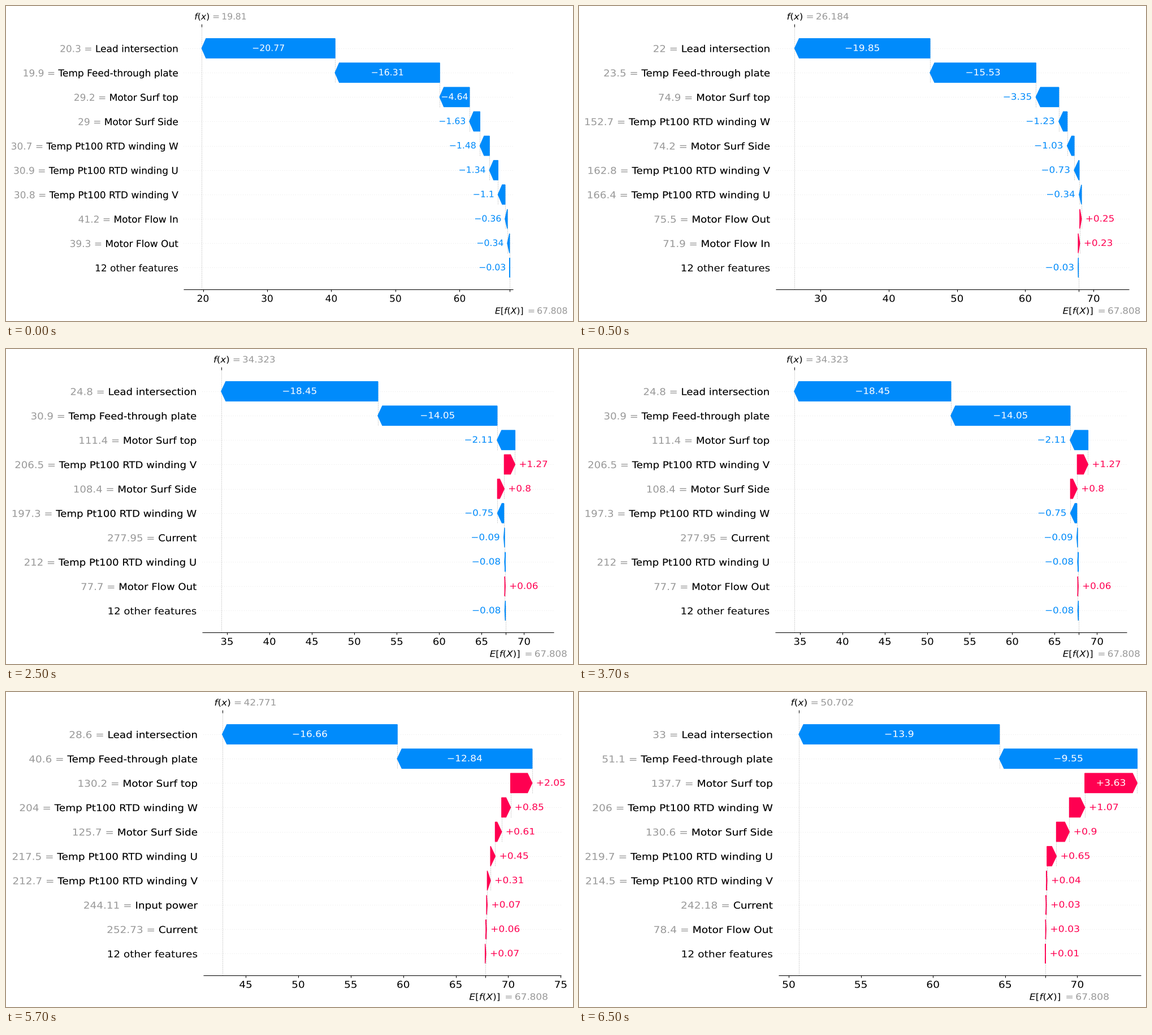
These frames come from a looping animation (1003x558 px, 8000 ms). A matplotlib script:

```python
import math

import matplotlib.pyplot as plt
from matplotlib.animation import FuncAnimation
from matplotlib.patches import PathPatch, Polygon
from matplotlib.textpath import TextPath
from matplotlib.transforms import Affine2D

W, H, DPI = 1003, 558, 64
BLUE, RED, GRAY = "#008bfb", "#ff0051", "#999999"

VRES = 93.0           # vertical pixels per inch of the chart
AXIS_INCHES = 6.2     # width of the chart's x axis
BOTTOM, PITCH = 501.9, 43.17
TOP = BOTTOM - 10.78 * PITCH
BASE = 67.808

LEAD, PLATE = "Lead intersection", "Temp Feed-through plate"
SURF_TOP, SURF_SIDE = "Motor Surf top", "Motor Surf Side"
WIND_U, WIND_V, WIND_W = (f"Temp Pt100 RTD winding {c}" for c in "UVW")
FLOW_IN, FLOW_OUT = "Motor Flow In", "Motor Flow Out"
CURRENT, POWER, OTHER = "Current", "Input power", "12 other features"

# fx, axis pixels (left, right), axis limits, tick step, rows (reading, feature, effect)
VIEWS = [
    (19.81, (314, 897), (16.96, 68.33), 10, [
        ("20.3", LEAD, -20.77), ("19.9", PLATE, -16.31),
        ("29.2", SURF_TOP, -4.64), ("29", SURF_SIDE, -1.63),
        ("30.7", WIND_W, -1.48), ("30.9", WIND_U, -1.34),
        ("30.8", WIND_V, -1.1), ("41.2", FLOW_IN, -0.36),
        ("39.3", FLOW_OUT, -0.34), ("", OTHER, -0.03)]),
    (26.184, (348, 973), (23.41, 75.22), 10, [
        ("22", LEAD, -19.85), ("23.5", PLATE, -15.53),
        ("74.9", SURF_TOP, -3.35), ("152.7", WIND_W, -1.23),
        ("74.2", SURF_SIDE, -1.03), ("162.8", WIND_V, -0.73),
        ("166.4", WIND_U, -0.34), ("75.5", FLOW_OUT, 0.25),
        ("71.9", FLOW_IN, 0.23), ("", OTHER, -0.03)]),
    (34.323, (347, 969), (32.07, 73.5), 5, [
        ("24.8", LEAD, -18.45), ("30.9", PLATE, -14.05),
        ("111.4", SURF_TOP, -2.11), ("206.5", WIND_V, 1.27),
        ("108.4", SURF_SIDE, 0.8), ("197.3", WIND_W, -0.75),
        ("277.95", CURRENT, -0.09), ("212", WIND_U, -0.08),
        ("77.7", FLOW_OUT, 0.06), ("", OTHER, -0.08)]),
    (42.771, (349, 982), (40.96, 75.035), 5, [
        ("28.6", LEAD, -16.66), ("40.6", PLATE, -12.84),
        ("130.2", SURF_TOP, 2.05), ("204", WIND_W, 0.85),
        ("125.7", SURF_SIDE, 0.61), ("217.5", WIND_U, 0.45),
        ("212.7", WIND_V, 0.31), ("244.11", POWER, 0.07),
        ("252.73", CURRENT, 0.06), ("", OTHER, 0.07)]),
    (50.702, (353, 994), (49.295, 74.41), 5, [
        ("33", LEAD, -13.9), ("51.1", PLATE, -9.55),
        ("137.7", SURF_TOP, 3.63), ("206", WIND_W, 1.07),
        ("130.6", SURF_SIDE, 0.9), ("219.7", WIND_U, 0.65),
        ("214.5", WIND_V, 0.04), ("242.18", CURRENT, 0.03),
        ("78.4", FLOW_OUT, 0.03), ("", OTHER, 0.01)]),
]

plt.rcParams["font.family"] = "DejaVu Sans"
plt.rcParams["mathtext.fontset"] = "dejavusans"
fig = plt.figure(figsize=(W / DPI, H / DPI), dpi=DPI, facecolor="white")


def row_y(i):
    return BOTTOM - (0.89 + 9 - i) * PITCH


def signed(v):
    return f"{v:+.2f}".rstrip("0").replace("-", "\u2212")


class Waterfall:
    def __init__(self, fx, span, lim, step, rows):
        self.left, self.right = span
        self.lim = lim
        self.hres = (self.right - self.left) / AXIS_INCHES
        self.ax = fig.add_axes([0, 0, 1, 1])
        self.ax.set(xlim=(0, W), ylim=(H, 0))
        self.ax.set_axis_off()
        self.guides(fx, rows)
        self.axis(fx, step)
        self.rows(fx, rows)

    def x(self, v):
        lo, hi = self.lim
        return self.left + (v - lo) / (hi - lo) * (self.right - self.left)

    def pt(self, n):
        return n / 72 * self.hres

    def line(self, xs, ys, color="black", lw=0.8, **kw):
        self.ax.plot(xs, ys, color=color, lw=lw * VRES / DPI,
                     solid_capstyle="butt", **kw)

    def glyphs(self, s, size):
        scale = Affine2D().scale(self.hres / 72, -VRES / 72)
        return scale.transform_path(TextPath((0, 0), s, size=size))

    def advance(self, s, size):
        """Pen travel of s, side bearings included."""
        ends = [self.glyphs(t, size).get_extents().x1 for t in (s + "I", "I")]
        return ends[0] - ends[1]

    def text(self, x, y, s, size, color="black", align=0):
        """Draw s on baseline y; align 0, 0.5 or 1 is left, centre or right."""
        if align:
            x -= align * self.advance(s, size)
        path = Affine2D().translate(x, y).transform_path(self.glyphs(s, size))
        self.ax.add_patch(PathPatch(path, fc=color, lw=0, zorder=4))

    def guides(self, fx, rows):
        dash = dict(color="#bbbbbb", lw=0.5, ls="--", zorder=0)
        for i in range(len(rows)):
            self.line([self.left, self.right], [row_y(i)] * 2, "#cccccc", 0.5,
                      dashes=(1, 5), zorder=0)
        loc = fx
        for i, (_, _, v) in enumerate(rows[:-1]):
            loc -= v
            self.line([self.x(loc)] * 2,
                      [row_y(i + 1.4), row_y(i - 0.4)], **dash)
        self.line([self.x(fx)] * 2, [BOTTOM, TOP], **dash)
        self.line([self.x(BASE)] * 2,
                  [BOTTOM, BOTTOM + (TOP - BOTTOM) / 10], **dash)

    def axis(self, fx, step):
        tick = 3.5 / 72 * VRES
        self.line([self.left, self.right], [BOTTOM] * 2)
        first = math.ceil(self.lim[0] / step) * step
        for v in range(first, math.floor(self.lim[1]) + 1, step):
            self.line([self.x(v)] * 2, [BOTTOM, BOTTOM + tick])
            self.text(self.x(v), 524, str(v), 13, align=0.5)

        x = self.x(BASE)
        self.line([x, x], [BOTTOM, BOTTOM + tick])
        self.text(x - self.pt(20), 545.3, "$E[f(X)]$", 12)
        self.text(x + self.pt(22), 545.3, f"$ = {BASE}$", 12, GRAY)

        x = self.x(fx)
        self.line([x, x], [TOP, TOP - tick])
        self.text(x - self.pt(10), 24, "$f(x)$", 12)
        self.text(x + self.pt(12), 24, f"$ = {fx}$", 12, GRAY)

    def rows(self, fx, rows):
        loc = fx
        for i, (reading, name, v) in enumerate(rows):
            y = row_y(i)
            edge = self.left - self.pt(7)
            if reading:
                self.text(edge, y + 6.6, f"{reading} = {name}", 13, GRAY, 1)
            self.text(edge, y + 6.6, name, 13, align=1)
            self.arrow(self.x(loc - v), self.x(loc), y, v)
            loc -= v

    def arrow(self, x0, x1, y, v):
        color, way = (RED, 1) if v > 0 else (BLUE, -1)
        half = 0.4 * PITCH
        neck = x1 - way * min(abs(x1 - x0), 0.08 * self.hres)
        self.ax.add_patch(Polygon(
            [(x0, y - half), (neck, y - half), (x1, y),
             (neck, y + half), (x0, y + half)],
            fc=color, ec=color, lw=VRES / DPI, zorder=3))

        label = signed(v)
        if self.advance(label, 12) < abs(x1 - x0):
            self.text((x0 + x1) / 2, y + 4.7, label, 12, "white", 0.5)
        else:
            self.text(x1 + way * self.pt(5), y + 4.7, label, 12, color,
                      0 if v > 0 else 1)


charts = [Waterfall(*view) for view in VIEWS]


def show(frame):
    current = (frame + 3) // 4
    for i, chart in enumerate(charts):
        chart.ax.set_visible(i == current)
    return []


show(0)
anim = FuncAnimation(fig, show, frames=16, interval=500, repeat=True,
                     repeat_delay=0, blit=False)
plt.show()
```
